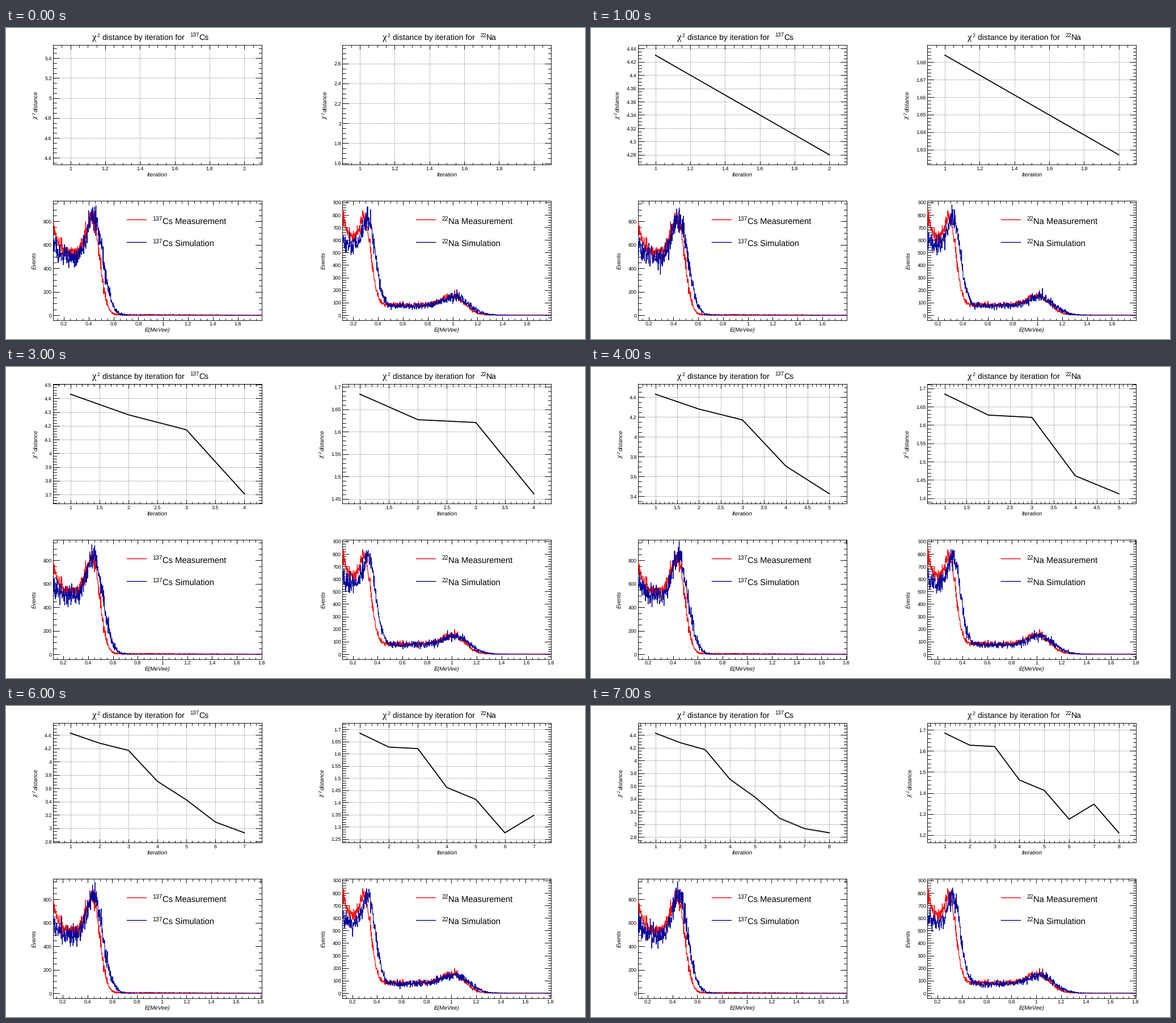
A matplotlib script that plays this animation: 1021x549 px, repeating every 8 s.

```python
import math
import numpy as np
import matplotlib.pyplot as plt
from matplotlib.animation import FuncAnimation

W, H, DPI = 1021, 549, 64
PT = 72 / DPI                      # points per pixel
FRAMES, INTERVAL = 8, 1000
LEFT, WIDTH, SHIFT = 83, 368, 510.4
TOP_BOX, LOW_BOX = (30.4, 241.4), (305.4, 516.2)
BINS = 800
RED, BLUE = "#ff0000", "#000099"


def shoulder(x, center, peak, plateau, rise, fall):
    """Plateau that swells to a peak and then drops to zero."""
    d = x - center
    before = plateau + (peak - plateau) * np.exp(-0.5 * (d / rise) ** 2)
    after = peak * np.exp(-0.5 * (d / fall) ** 2)
    return np.where(d < 0, before, after)


def decay(x, height, length):
    return height * np.exp(-x / length)


def cs_measured(x):
    return shoulder(x, 69, 825, 520, 10.8, 12.8) + decay(x, 245, 10) + 7 * (1 - x / WIDTH)


def cs_simulated(x):
    return shoulder(x, 71, 835, 485, 11, 16.5) + decay(x, 130, 10)


def na_measured(x):
    return (shoulder(x, 38, 705, 515, 7, 11.5) + shoulder(x, 194, 155, 80, 18, 21)
            + decay(x, 235, 7) + 4 * (1 - x / WIDTH))


def na_simulated(x):
    return (shoulder(x, 45, 700, 475, 9, 13) + shoulder(x, 198, 145, 73, 21, 24)
            + decay(x, 65, 7))


PANELS = [
    dict(dx=0, title_x=152, mass="137", element="Cs", seed=1, events=(-44, 974),
         chi2=[4.43, 4.28, 4.171, 3.705, 3.426, 3.092, 2.93, 2.864],
         measured=cs_measured, simulated=cs_simulated, spread=(1.5, 2.0)),
    dict(dx=SHIFT, title_x=664, mass="22", element="Na", seed=2, events=(-42, 911),
         chi2=[1.684, 1.627, 1.6207, 1.4614, 1.4124, 1.2756, 1.347, 1.211],
         measured=na_measured, simulated=na_simulated, spread=(1.1, 1.5)),
]

plt.rcParams.update({"font.family": "Liberation Sans", "text.hinting": "none"})
fig = plt.figure(figsize=(W / DPI, H / DPI), dpi=DPI, facecolor="white")
ax = fig.add_axes([0, 0, 1, 1])


def text(x, y, s, size, **kw):
    ax.text(x, y, s, fontsize=size * PT, va="baseline", rotation_mode="anchor", **kw)


def line(xs, ys, color="black", width=0.9, **kw):
    ax.plot(xs, ys, color=color, lw=width * PT, **kw)


def nice(x):
    power = 10 ** math.floor(math.log10(x) + 1e-9)
    return next(m * power for m in (1, 2, 5, 10) if m * power >= x * (1 - 1e-9))


def multiples(step, low, high):
    return step * np.arange(math.ceil(low / step - 1e-6), math.floor(high / step + 1e-6) + 1)


def scale(v, span, start, end):
    return start + (np.asarray(v) - span[0]) / (span[1] - span[0]) * (end - start)


def draw_axes(dx, box, x_span, y_span, grid):
    """Frame, ticks on all four sides and labels; returns the longest y label."""
    x0, x1 = LEFT + dx, LEFT + dx + WIDTH
    top, bottom = box
    x_step, y_step = (nice((b - a) / 10) for a, b in (x_span, y_span))
    x_major, y_major = multiples(x_step, *x_span), multiples(y_step, *y_span)
    x_pos, y_pos = scale(x_major, x_span, x0, x1), scale(y_major, y_span, bottom, top)

    if grid:
        dots = dict(color="#444444", linestyle=(0, (1, 2)), dash_capstyle="butt")
        for x in x_pos:
            line([x, x], [bottom, top], **dots)
        for y in y_pos:
            line([x0, x1], [y, y], **dots)

    x_minor = scale(multiples(nice(x_step / 5), *x_span), x_span, x0, x1)
    y_minor = scale(multiples(nice(y_step / 5), *y_span), y_span, bottom, top)
    for xs, ys, part in ((x_pos, y_pos, 1), (x_minor, y_minor, 0.5)):
        for x in xs:
            line([x, x], [bottom, bottom - 6.3 * part])
            line([x, x], [top, top + 6.3 * part])
        for y in ys:
            line([x0, x0 + 11 * part], [y, y])
            line([x1, x1 - 11 * part], [y, y])
    line([x0, x1, x1, x0, x0], [top, top, bottom, bottom, top])

    for x, v in zip(x_pos, x_major):
        text(x, bottom + 9.2, f"{round(v, 6):g}", 9, ha="center")
    labels = [f"{round(v, 6):g}" for v in y_major]
    for y, s in zip(y_pos, labels):
        text(x0 - 2.3, y + 3.5, s, 9, ha="right")
    return max(map(len, labels))


def isotope(x, y, panel, rest, size, small, lift):
    text(x, y - lift, panel["mass"], small)
    text(x + 0.556 * small * len(panel["mass"]), y, panel["element"] + rest, size)


def draw_distance(panel, count):
    dx, values = panel["dx"], panel["chi2"][:count]
    low, high = min(values), max(values)
    if count == 1:
        x_span, y_span = (0.9, 2.1), (low - 0.1, low + 1.1)
    else:
        margin = 0.1 * (high - low)
        x_span = (1 - 0.1 * (count - 1), count + 0.1 * (count - 1))
        y_span = (low - margin, high + margin)
    longest = draw_axes(dx, TOP_BOX, x_span, y_span, True)

    xs = scale(np.arange(1, count + 1), x_span, LEFT + dx, LEFT + dx + WIDTH)
    ys = scale(values, y_span, TOP_BOX[1], TOP_BOX[0])
    line(xs, ys, width=1.8, solid_joinstyle="round")

    x = panel["title_x"]
    text(x - 0.5, 21, "χ", 17, family="Liberation Serif")
    text(x + 8.6, 16.5, "2", 9)
    text(x + 18.5, 21, "distance by iteration for", 14)
    isotope(x + 172.3, 21, panel, "", 14, 9.8, 5)

    text(267 + dx, 262.3, "Iteration", 10, style="italic", ha="center")
    x = (55.5 if longest <= 3 else 50) + dx
    text(x, 161, "χ", 12, style="italic", family="Liberation Serif", rotation=90)
    text(x - 3.5, 154.5, "2", 7, style="italic", rotation=90)
    text(x, 148, "distance", 10, style="italic", rotation=90)


def draw_spectra(panel, i):
    dx = panel["dx"]
    drift = min(i, 6)              # the energy calibration settles
    energy = (0.113 + 0.0013 * drift, 1.794 + 0.0026 * drift)
    draw_axes(dx, LOW_BOX, energy, panel["events"], False)

    x = (np.arange(BINS) + 0.5) * WIDTH / BINS
    seeds = panel["seed"], 100 * panel["seed"] + i
    curves = panel["measured"], panel["simulated"]
    for curve, spread, seed, color in zip(curves, panel["spread"], seeds, (RED, BLUE)):
        mean = curve(x)
        noise = np.random.default_rng(seed).normal(size=BINS)
        counts = np.maximum(mean + spread * np.sqrt(mean) * noise, 0)
        ys = scale(counts, panel["events"], LOW_BOX[1], LOW_BOX[0])
        line(LEFT + dx + x, ys, color, 1.1, drawstyle="steps-mid")

    for y, color, name in ((338, RED, " Measurement"), (378, BLUE, " Simulation")):
        line([213 + dx, 247 + dx], [y, y], color, 1.4)
        isotope(258.2 + dx, y + 8, panel, name, 14.7, 10.5, 6)

    text(267 + dx, 536.3, "E(MeVee)", 10, style="italic", ha="center")
    text(52.5 + dx, 411, "Events", 10, style="italic", ha="center", rotation=90)


def draw(i):
    ax.cla()
    ax.set(xlim=(0, W), ylim=(H, 0))
    ax.axis("off")
    for panel in PANELS:
        draw_distance(panel, i + 1)
        draw_spectra(panel, i)
    return ax.get_children()


animation = FuncAnimation(fig, draw, frames=FRAMES, interval=INTERVAL,
                          init_func=lambda: [], repeat=True, repeat_delay=0)
plt.show()
```
